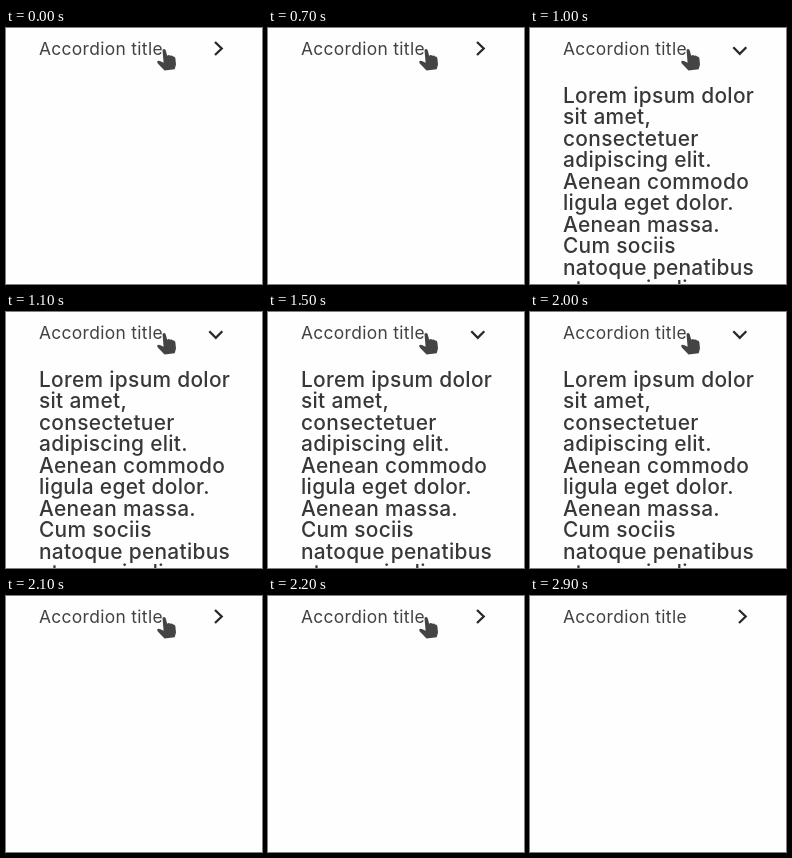
Recreate the animation shown at these times as an HTML page. Size 256 by 256 pixels, loop 3 s.

```html
<!DOCTYPE html>
<html lang="en">
<head>
<meta charset="utf-8">
<title>Accordion</title>
<style>
  html, body { margin: 0; width: 100%; height: 100%; overflow: hidden; background: #fefefe; }
  svg { display: block; width: 100vw; height: 100vh; }
  text { font-family: Inter, sans-serif; }
  #title { font-size: 17.4px; letter-spacing: .33px; fill: #424242; }
  #body { font-size: 20.9px; letter-spacing: .3px; font-weight: 500; fill: #383838; }
  #chevron { fill: none; stroke: #292929; stroke-width: 2.3; }
</style>
</head>
<body>
<svg viewBox="0 0 256 256">
  <text id="title" x="33" y="26.8">Accordion title</text>
  <path id="chevron"/>
  <text id="body"></text>
  <path id="hand" fill="#444" stroke="#fefefe" stroke-width="1.6" paint-order="stroke" d="M156.5 22Q158 20 159.6 22L161.2 27.8Q163 26.3 164.3 27.8Q166 26.8 167 28.5Q169 28 169.4 30.5L170 36.5L168.7 41.3L158.5 42.5L152 35.7Q150.3 33.5 152.2 32.8Q153.5 32.5 157.6 34.8Z"/>
</svg>
<script>
const LOOP = 3000, OPEN = 1000, CLOSE = 2100, LEAVE = 2400;
const lines = ['Lorem ipsum dolor', 'sit amet,', 'consectetuer', 'adipiscing elit.',
  'Aenean commodo', 'ligula eget dolor.', 'Aenean massa.', 'Cum sociis',
  'natoque penatibus', 'et magnis dis'];
const $ = id => document.getElementById(id);
const show = (el, on) => el.setAttribute('visibility', on ? 'visible' : 'hidden');

$('body').innerHTML = lines
  .map((line, i) => `<tspan x="33" y="${74.8 + i * 21.5}">${line}</tspan>`).join('');

function draw() {
  const t = performance.now() % LOOP;
  const open = t >= OPEN && t < CLOSE;
  show($('body'), open);
  show($('hand'), t < LEAVE);
  $('chevron').setAttribute('d', open ? 'M203.3 19.3L209.8 25.8L216.3 19.3' : 'M209 14L215.7 20.5L209 27');
  requestAnimationFrame(draw);
}
draw();
</script>
</body>
</html>
```
